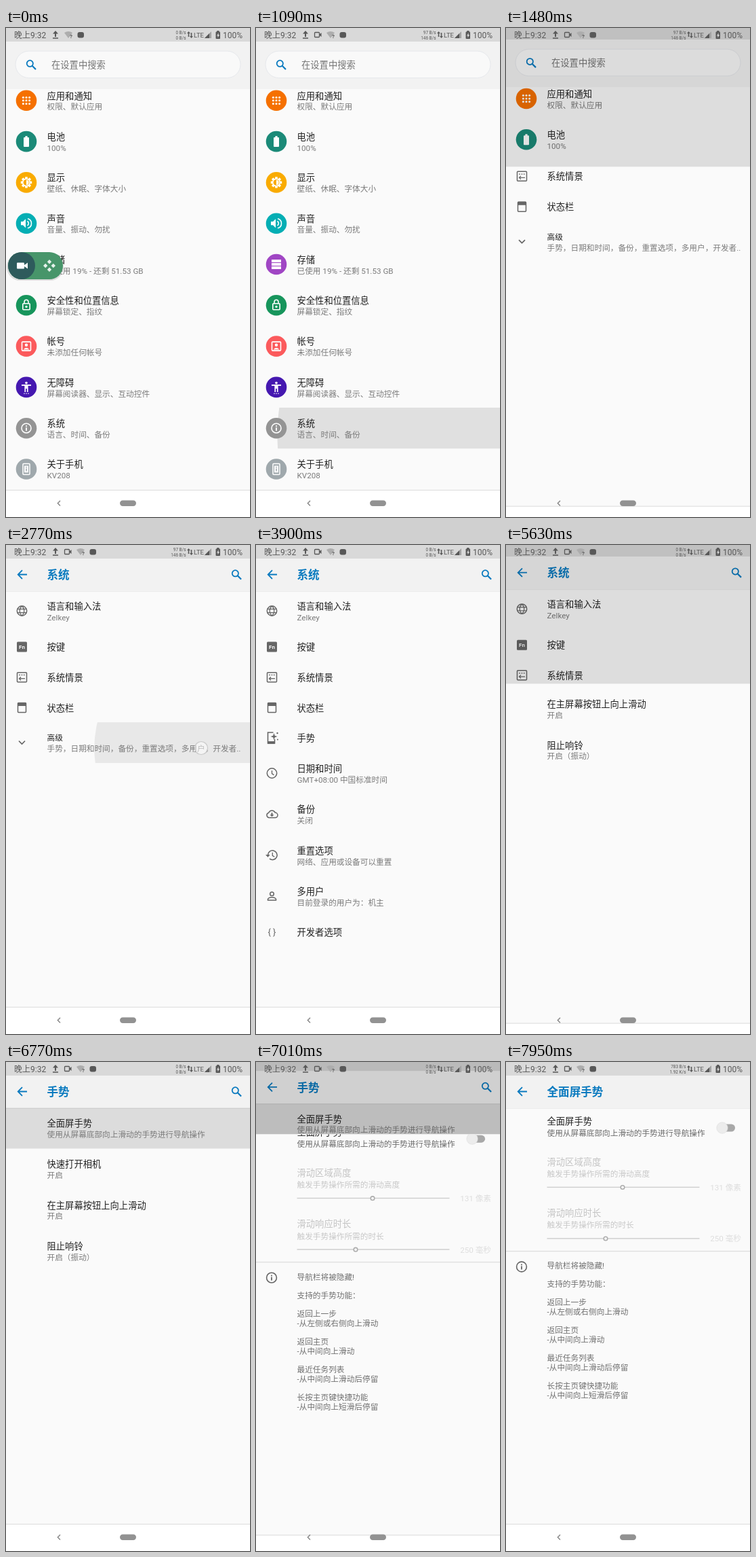
An HTML page for the animation above (8 s loop, 360 by 720 pixels).

```html
<!DOCTYPE html>
<html lang="zh-CN">
<head>
<meta charset="utf-8">
<title>系统设置</title>
<style>
html, body { margin: 0; width: 100%; height: 100%; overflow: hidden; background: #fafafa; }
svg { display: block; width: 100%; height: 100%; }
text { font-family: Roboto, "Noto Sans CJK SC", "Noto Sans CJK", sans-serif; white-space: pre; }
</style>
</head>
<body>
<svg id="stage" viewBox="0 0 360 720"></svg>
<script>
const INK = '#212121', SUB = '#7b7b7b', ACCENT = '#0a7abf', BODY = '#fafafa';
const BAR = '#f2f2f2', GREY = '#666', STATUS = '#585858', STATUS_BG = '#d9d9d9', RULE = '#dcdcdc';

// ---- drawing helpers; text is placed by its vertical centre ----
const text = (x, y, s, size, fill, extra = '') =>
  `<text x="${x}" y="${(y + size * 0.38).toFixed(2)}" font-size="${size}" fill="${fill}" ${extra}>${s}</text>`;
const rect = (x, y, w, h, fill, rx = 0, extra = '') =>
  `<rect x="${x}" y="${y}" width="${w}" height="${h}" rx="${rx}" fill="${fill}" ${extra}/>`;
const circle = (x, y, r, fill, extra = '') => `<circle cx="${x}" cy="${y}" r="${r}" fill="${fill}" ${extra}/>`;
const path = (d, fill) => `<path d="${d}" fill="${fill}"/>`;
const line = (d, color, w = 1.5, extra = '') =>
  `<path d="${d}" fill="none" stroke="${color}" stroke-width="${w}" ${extra}/>`;
const box = (x, y, w, h, color, sw = 1.5) =>
  rect(x, y, w, h, 'none', 1, `stroke="${color}" stroke-width="${sw}"`);
const at = (x, y, s) => `<g transform="translate(${x} ${y})">${s}</g>`;
const title = (y, s, fill = INK) => text(60.5, y, s, 13.3, fill);
const note = (y, s, fill = SUB) => text(60.5, y, s, 11.66, fill);

const search = color => circle(-1.7, -1.7, 4.6, 'none', `stroke="${color}" stroke-width="1.8"`) +
  line('M1.8 1.8L7 7', color, 2.2);
const ring = (r, color = GREY, w = 1.5) => circle(0, 0, r, 'none', `stroke="${color}" stroke-width="${w}"`);
const info = (r, color) => ring(r, color, 1.6) + rect(-.9, -1, 1.8, 5, color) + rect(-.9, -4, 1.8, 1.8, color);
const hands = line('M0 -4V.6L3 2.6', GREY, 1.3);

// ---- white glyphs of the first page ----
const W = '#fff', AMBER = '#f9ab00', SILVER = '#9fa8ac';
const dots = [-4.6, 0, 4.6].flatMap(x => [-4.6, 0, 4.6].map(y => circle(x, y, 1.5, W))).join('');
const sun = Array.from({ length: 8 }, (_, i) =>
  rect(-1.8, -8.2, 3.6, 4, W, 0, `transform="rotate(${i * 45})"`)).join('');
const glyphs = {
  apps: dots,
  battery: rect(-4, -6, 8, 14, W, 1) + rect(-1.6, -8, 3.2, 3, W),
  display: sun + circle(0, 0, 6, W) + circle(0, 0, 4.4, AMBER) + path('M0 -3.6A3.6 3.6 0 0 1 0 3.6Z', W),
  sound: path('M-8 -2.6H-5L-1 -6.5V6.5L-5 2.6H-8Z', W) +
    line('M1.4 -3.2A3.6 3.6 0 0 1 1.4 3.2M2 -7A7.2 7.2 0 0 1 2 7', W, 1.6),
  storage: [-5, 0, 5].map(y => rect(-7, y - 2, 14, 4, W)).join(''),
  lock: box(-5.2, -2.5, 10.4, 9, W, 1.6) + line('M-3 -2.5V-5A3 3 0 0 1 3 -5V-2.5', W, 1.6) + circle(0, 2, 1.6, W),
  account: box(-6.5, -6.5, 13, 13, W, 1.6) + circle(0, -1.8, 2.2, W) + path('M-4.5 5Q0 -.5 4.5 5Z', W),
  access: circle(0, -6.3, 1.8, W) + line('M-7 -3H7', W, 1.9) + path('M-2.6 -3H2.6V7H.9V2H-.9V7H-2.6Z', W) +
    [-3, 0, 3].map(x => circle(x, 9.3, .8, W)).join(''),
  info: info(7, W),
  phone: box(-5, -8, 10, 16, W) + rect(-3, -5, 6, 10, W) +
    rect(-.8, -1, 1.6, 4, SILVER) + rect(-.8, -3.6, 1.6, 1.6, SILVER)
};

// ---- grey icons of the second page ----
const icons = {
  globe: ring(7.2) + line('M-7 -2.6H7M-7 2.6H7M0 -7.2C-4.4 -3 -4.4 3 0 7.2C4.4 3 4.4 -3 0 -7.2', GREY, 1.2),
  fn: rect(-7.5, -7.5, 15, 15, GREY, 1.5) + text(0, .3, 'Fn', 8, BODY, 'text-anchor="middle" font-weight="700"'),
  profile: box(-7, -7, 14, 14, GREY) + line('M-4.5 -3.3H4.5', GREY, 1.3, 'stroke-dasharray="2 1.4"') +
    line('M-4 2H4.5M-1.5 -.5L-4 2L-1.5 4.5', GREY, 1.3),
  bar: box(-6, -7, 12, 14, GREY) + rect(-6.5, -7.5, 13, 5, GREY, 1),
  gesture: line('M2 -8H-6V8H4V2', GREY, 1.6) + rect(-6, 5, 10, 3.6, GREY) +
    path('M3 -7L4.3 -3.3L8 -2L4.3 -.7L3 3L1.7 -.7L-2 -2L1.7 -3.3Z', GREY) +
    circle(8, -7, 1.2, GREY) + circle(8.4, 2.5, 1, GREY),
  clock: ring(7.2) + hands,
  cloud: line('M-4.5 5.2A3.7 3.7 0 0 1 -4.8 -2A5.2 5.2 0 0 1 4.8 -2.2A3.7 3.7 0 0 1 4.8 5.2Z', GREY) +
    path('M-1 -2H1V.8H3L0 3.8L-3 .8H-1Z', GREY),
  reset: line('M-6 0A6.8 6.8 0 1 1 -3.5 5.2', GREY) + path('M-9.4 -.6H-2.8L-6 3Z', GREY) + at(.8, 0, hands),
  user: circle(0, -3.2, 2.8, 'none', `stroke="${GREY}" stroke-width="1.5"`) +
    line('M-6 6V4.3C-4 .8 4 .8 6 4.3V6Z', GREY),
  code: text(0, -.6, '{ }', 13, GREY, 'text-anchor="middle"')
};

// ---- pages ----
const frame = (head, body) =>
  rect(0, 0, 360, 760, BODY) + rect(0, 0, 360, 20, STATUS_BG) + head +
  rect(0, 681, 360, 80, '#fff') + rect(0, 680, 360, 1, RULE) + body;
const toolbar = (name, find = true) =>
  rect(0, 20, 360, 48, BAR) + rect(0, 68, 360, 1, '#ececec') +
  at(24, 43.5, line('M7 0H-6M0 -6.3L-6.3 0L0 6.3', ACCENT, 1.8)) +
  text(60.5, 43.8, name, 16.6, ACCENT, 'font-weight="700"') +
  (find ? at(340, 43.5, search(ACCENT)) : '');

const homeRows = [
  ['#f57000', 'apps', '应用和通知', '权限、默认应用'],
  ['#1b8a78', 'battery', '电池', '100%'],
  [AMBER, 'display', '显示', '壁纸、休眠、字体大小'],
  ['#04aeb4', 'sound', '声音', '音量、振动、勿扰'],
  ['#a046c4', 'storage', '存储', '已使用 19% - 还剩 51.53 GB'],
  ['#17955c', 'lock', '安全性和位置信息', '屏幕锁定、指纹'],
  ['#fb5a5c', 'account', '帐号', '未添加任何帐号'],
  ['#4518b0', 'access', '无障碍', '屏幕阅读器、显示、互动控件'],
  ['#949494', 'info', '系统', '语言、时间、备份'],
  [SILVER, 'phone', '关于手机', 'KV208']
];
const home = frame(
  rect(0, 20, 360, 70, BAR) +
  rect(14, 34, 332, 39.5, '#f9f9f9', 19.7, 'stroke="#e6e8ec" stroke-width="1"') +
  at(37, 54, search(ACCENT)) + text(67, 54, '在设置中搜索', 13.3, '#747474'),
  '<g id="ink0"></g>' + homeRows.map(([color, glyph, name, sub], i) => {
    const y = 106.8 + i * 60.3;
    return circle(30, y, 15.3, color) + at(30, y, glyphs[glyph]) + title(y - 7.2, name) + note(y + 9.2, sub);
  }).join(''));

const item = ([y, icon, name, sub]) =>
  at(23.5, sub ? y + 7 : y, icons[icon]) + title(y, name) + (sub ? note(y + 16.4, sub) : '');
const system = frame(toolbar('系统'),
  '<g id="ink1"></g>' +
  [[90, 'globe', '语言和输入法', 'Zelkey'], [150, 'fn', '按键'], [194.7, 'profile', '系统情景'],
    [239.5, 'bar', '状态栏']].map(item).join('') +
  '<g id="advanced">' + line('M19 288.5L23.5 293L28 288.5', GREY, 1.7) + note(284, '高级', INK) +
  note(299.8, '手势，日期和时间，备份，重置选项，多用户，开发者..') + '</g><g id="more">' +
  [[284, 'gesture', '手势'], [329, 'clock', '日期和时间', 'GMT+08:00 中国标准时间'], [389.3, 'cloud', '备份', '关闭'],
    [449.7, 'reset', '重置选项', '网络、应用或设备可以重置'], [510, 'user', '多用户', '目前登录的用户为：机主'],
    [570, 'code', '开发者选项']].map(item).join('') + '</g>');

const gestures = frame(toolbar('手势'),
  '<g id="ink2"></g>' +
  [['全面屏手势', '使用从屏幕底部向上滑动的手势进行导航操作'], ['快速打开相机', '开启'],
    ['在主屏幕按钮上向上滑动', '开启'], ['阻止响铃', '开启（振动）']].map(([name, sub], i) =>
    title(90 + i * 60.3, name) + note(106.3 + i * 60.3, sub)).join(''));

const slider = (y, name, sub, knob, value) =>
  title(y, name, '#c4c4c4') + note(y + 18, sub, '#c8c8c8') +
  rect(60.5, y + 37.2, 225, 1.4, '#cdcdcd') +
  circle(knob, y + 38, 2.8, BODY, 'stroke="#adadad" stroke-width="1.6"') +
  text(347, y + 38, value, 11.66, '#dedede', 'text-anchor="end"');
const footer = [[300, '导航栏将被隐藏!'], [327, '支持的手势功能：'], [354, '返回上一步'], [368, '-从左侧或右侧向上滑动'],
  [395, '返回主页'], [409, '-从中间向上滑动'], [436, '最近任务列表'], [450, '-从中间向上滑动后停留'],
  [477, '长按主页键快捷功能'], [491, '-从中间向上短滑后停留']];
const fullscreen = frame(toolbar('全面屏手势', false),
  title(87, '全面屏手势') + note(104.8, '使用从屏幕底部向上滑动的手势进行导航操作', '#6a6a6a') +
  rect(314, 91.5, 24, 11, '#a8a8a8', 5.5) + circle(319, 97, 8.2, '#ececec', 'stroke="#dcdcdc" stroke-width=".6"') +
  slider(146.5, '滑动区域高度', '触发手势操作所需的滑动高度', 172, '131 像素') +
  slider(222, '滑动响应时长', '触发手势操作所需的时长', 147, '250 毫秒') +
  rect(0, 278, 360, 1.2, RULE) + at(23, 301.5, info(7.4, GREY)) +
  footer.map(([y, s]) => note(y, s, '#707070')).join(''));

// ---- system overlay ----
const wifi = path('M-6 -3Q0 -7 6 -3L0 5Z', '#adadad') + text(2, 2, '?', 8, STATUS, 'font-weight="700"');
const camera = box(-4.5, -3.5, 7, 7, STATUS, 1.3) + path('M3 -1L5.5 -3V3L3 1Z', STATUS);
const cross = [0, 90, 180, 270].map(a =>
  `<path transform="rotate(${a})" d="M0 -9L3.2 -5.8L0 -2.6L-3.2 -5.8Z" fill="#e6f2ec"/>`).join('');
const overlay =
  text(12, 10.3, '晚上9:32', 12, STATUS) +
  at(73, 10, path('M0 -6L4 -1.5H1V3H-1V-1.5H-4Z', STATUS) + rect(-4, 4.2, 8, 1.5, STATUS)) +
  `<g id="camera">${at(91, 10, camera)}</g>` +
  `<g id="notices">${at(110, 10, wifi)}${rect(123.5, 6, 9.5, 8.5, STATUS, 3)}</g>` +
  text(265.5, 6.3, '', 6.4, STATUS, 'id="up" text-anchor="end"') +
  text(265.5, 14.3, '', 6.4, STATUS, 'id="down" text-anchor="end"') +
  at(271.5, 10, path('M-2 -5L.4 -2H-1.2V3H-2.8V-2H-4.4Z', STATUS) + path('M2 5L4.4 2H2.8V-3H1.2V2H-.4Z', STATUS)) +
  text(277, 10.3, 'LTE', 9.6, STATUS) +
  path('M303 5V15H293Z', '#a2a2a2') + path('M300 8V15H293Z', STATUS) +
  rect(309.5, 5.5, 6.5, 10.5, STATUS, 1) + rect(311.2, 4, 3.2, 2, STATUS) +
  path('M313.5 7L311 11.5H312.5V14.5L315 10H313.5Z', STATUS_BG) +
  text(320, 10.3, '100%', 12, STATUS) +
  line('M80 696L76.3 699.8L80 703.6', '#858585', 1.4) + rect(168, 695.5, 24, 8.5, '#929292', 4.2) +
  '<g id="floater">' + rect(1, 332, 84, 40, '#000', 20, 'opacity=".12"') + rect(3, 330, 81, 40, '#47956a', 20) +
  circle(23, 350, 20, '#2e5b5c') + rect(16, 345.5, 11, 9, '#fff', 1) + path('M27 349L32 345.5V354.5L27 351Z', '#fff') +
  at(64, 350, cross) + '</g>' +
  '<g id="finger">' + circle(0, 0, 9.5, '#fff', 'fill-opacity=".5" stroke="#c8c8c8" stroke-width="1.2"') + '</g>';

const pages = [home, system, gestures, fullscreen];
const stage = document.getElementById('stage');
stage.innerHTML =
  '<defs><clipPath id="reveal"><rect id="cut" width="360" height="800"/></clipPath></defs>' +
  pages.map((p, i) => `<g id="page${i}">${p}${rect(0, 0, 360, 760, '#000', 0, `id="dim${i}"`)}</g>`).join('') + overlay;
const $ = id => document.getElementById(id);
const set = (id, name, value) => $(id).setAttribute(name, value);
const show = (id, on) => set(id, 'display', on ? 'inline' : 'none');
const ramp = (t, from, ms) => Math.max(0, Math.min(1, (t - from) / ms));

// ---- motion ----
const cubic = (a, b, c, d, s) => {
  const r = 1 - s;
  return a * r * r * r + 3 * b * s * r * r + 3 * c * s * s * r + d * s * s * s;
};
function solve(xs, ys, x) {
  let lo = 0, hi = 1;
  for (let i = 0; i < 24; i++) {
    const mid = (lo + hi) / 2;
    if (cubic(...xs, mid) < x) lo = mid; else hi = mid;
  }
  return cubic(...ys, lo);
}
const glide = x => solve([0, .4, .2, 1], [0, 0, 1, 1], x);
const wipe = x => x < 1 / 6
  ? solve([0, .05, .1333, .1667], [0, 0, .06, .4], x)
  : solve([.1667, .2083, .25, 1], [.4, .82, 1, 1], x);

const LOOP = 8000, OPEN = [1382, 5532, 6870], OPEN_MS = 425;
// a tap: page, touch point, row top and height, ripple start, fade-out time
const taps = [
  { page: 0, x: 330, y: 600, top: 559, h: 60.3, from: 900 },
  { page: 1, x: 288, y: 299, top: 261, h: 60, from: 2660, fade: 2870 },
  { page: 1, x: 300, y: 285, top: 262, h: 44.7, from: 5080 },
  { page: 2, x: 290, y: 98, top: 67.5, h: 60, from: 6410 }
];
taps.forEach((tap, i) => {
  $('ink' + tap.page).innerHTML += `<clipPath id="row${i}">${rect(0, tap.top, 360, tap.h, '#000')}</clipPath>` +
    `<g clip-path="url(#row${i})">${circle(tap.x, tap.y, 0, '#000', `id="ripple${i}"`)}</g>`;
});

function render(t) {
  const top = OPEN.filter(s => t >= s).length;
  const age = top ? ramp(t, OPEN[top - 1], OPEN_MS) : 1;
  const moving = age < 1, g = glide(age);
  pages.forEach((_, i) => {
    const id = 'page' + i, under = moving && i === top - 1;
    show(id, i === top || under);
    const dy = i === top ? 29.5 * (1 - g) : -14.4 * g;
    set(id, 'transform', `translate(0 ${dy.toFixed(2)})`);
    if (i === top && moving) set(id, 'clip-path', 'url(#reveal)');
    else $(id).removeAttribute('clip-path');
    set('dim' + i, 'opacity', under ? .14 * ramp(age * OPEN_MS, 0, 117) : 0);
  });
  set('cut', 'y', 690.5 * (1 - wipe(age)));

  let touch = null;
  taps.forEach((tap, i) => {
    const p = ramp(t, tap.from, 225);
    const fade = tap.fade ? 1 - ramp(t, tap.fade, 200) : 1;
    set('ripple' + i, 'r', 365 * p * (1 - .17 * (1 - p)) * .91 + 33 * p * p);
    set('ripple' + i, 'opacity', (p > 0 ? .02 + .1 * p : 0) * fade);
    if (t >= tap.from - 90 && t < tap.from + 130) touch = tap;
  });
  show('finger', touch);
  if (touch) set('finger', 'transform', `translate(${touch.x} ${touch.y})`);

  set('advanced', 'opacity', 1 - ramp(t, 2880, 120));
  set('more', 'opacity', ramp(t, 3000, 120));

  const recording = t >= 350;
  show('camera', recording);
  set('notices', 'transform', `translate(${recording ? 0 : -18} 0)`);
  set('floater', 'opacity', 1 - ramp(t, 150, 200));
  const [up, down] = t >= 7100 ? ['783 B/s', '1.92 K/s']
    : t >= 700 && t < 3000 ? ['97 B/s', '146 B/s'] : ['0 B/s', '0 B/s'];
  $('up').textContent = up;
  $('down').textContent = down;
}

const begin = performance.now();
function tick() {
  render((performance.now() - begin) % LOOP);
  requestAnimationFrame(tick);
}
render(0);
requestAnimationFrame(tick);
</script>
</body>
</html>
```
